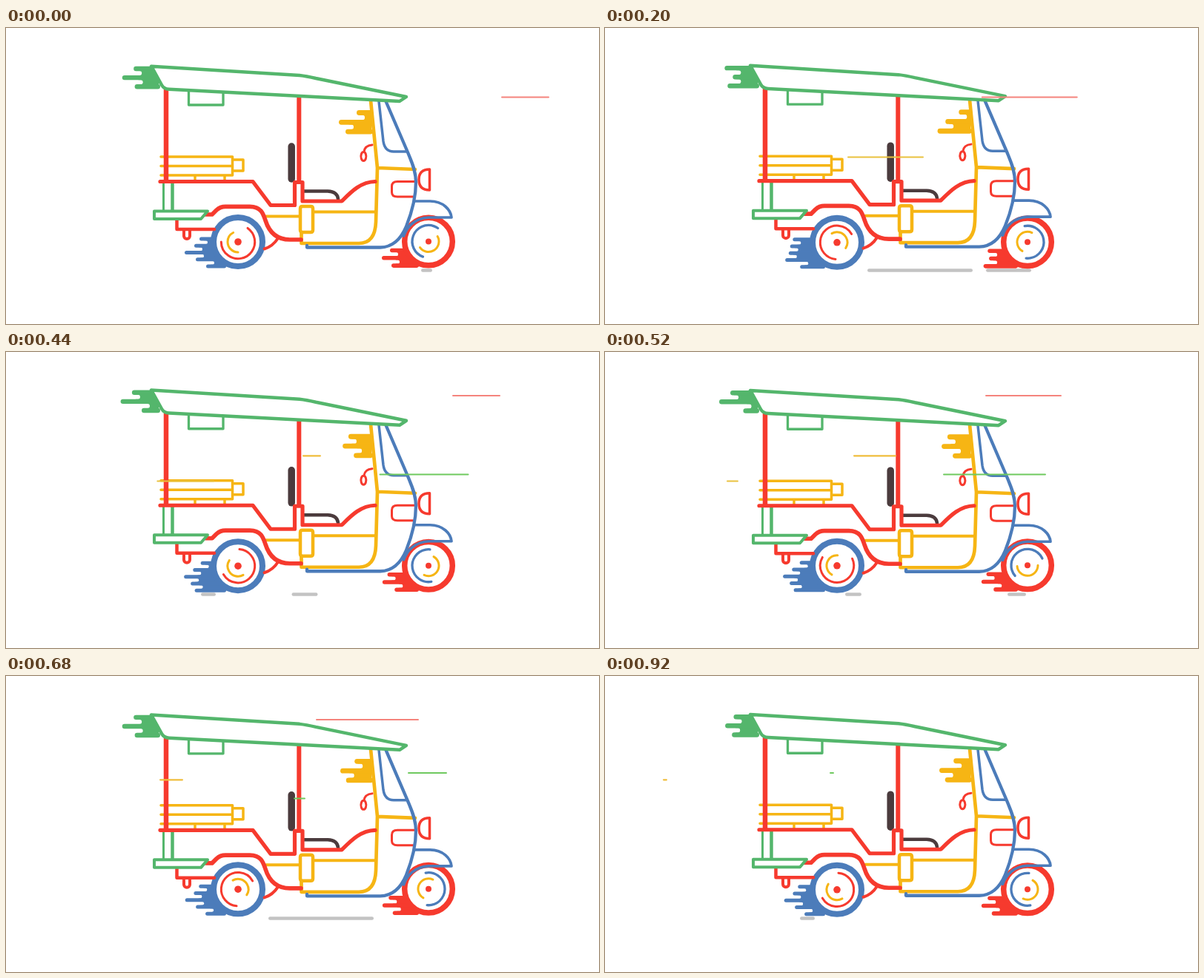
Write an HTML page with a canvas that moves like this. It is 800 px wide and 400 px high and loops after 0.96 s.

```html
<!DOCTYPE html>
<html lang="en">
<head>
<meta charset="utf-8">
<title>Speeding tuk-tuk</title>
<style>
html, body { margin: 0; width: 100%; height: 100%; overflow: hidden; background: #fff; }
canvas { display: block; }
</style>
</head>
<body>
<canvas id="stage" width="800" height="400"></canvas>
<script>
const ctx = document.getElementById('stage').getContext('2d');
const RED = '#f63a2e', GREEN = '#54b66c', BLUE = '#4c7cba', YELLOW = '#f6b514', DARK = '#4b3b3d';
const STEP = 40, STEPS = 24;

function stroke(color, width, d, fill) {
  const path = new Path2D(d);
  if (fill) { ctx.fillStyle = fill; ctx.fill(path); }
  ctx.strokeStyle = color;
  ctx.lineWidth = width;
  ctx.stroke(path);
}

// Horizontal round-capped bar whose caps lie inside x1..x2
function bar(color, width, x1, x2, y) {
  const r = Math.min(width, x2 - x1) / 2;
  stroke(color, width, `M${x1 + r} ${y}H${x2 - r}`);
}

function arc(color, width, x, y, r, from, to) {
  ctx.beginPath();
  ctx.arc(x, y, r, from * Math.PI / 180, to * Math.PI / 180);
  ctx.strokeStyle = color;
  ctx.lineWidth = width;
  ctx.stroke();
}

function disc(color, x, y, r) {
  ctx.beginPath();
  ctx.arc(x, y, r, 0, 7);
  ctx.fillStyle = color;
  ctx.fill();
}

// Flame-like rows: each cycle of 8 steps stretches from the rest pose to another and back
function streak(color, right, top, pitch, poses, time) {
  const t = (time + STEPS) % STEPS;
  const target = poses[1 + Math.floor(t / 8)];
  const w = (1 - Math.cos(t * Math.PI / 4)) / 2;
  const tips = poses[0].map((x, i) => x + (target[i] - x) * w);
  const half = pitch / 2;
  for (let i = 0; i < tips.length - 1; i++) {
    const notch = Math.max(tips[i], tips[i + 1]) + 11, y = top + (i + 0.5) * pitch;
    ctx.fillStyle = color;
    ctx.fillRect(notch - half, y - half, right - notch + half, pitch);
    bar('#fff', half, notch - 10, notch, y);
  }
  tips.forEach((x, i) => bar(color, half + 0.4, x, right + 2, top + i * pitch));
}

// Keys are [step, head, tail]
function dash(color, width, y, keys, t, dx = 0) {
  const i = keys.findIndex((key, n) => n && t <= key[0]);
  if (i < 1 || t < keys[0][0]) return;
  const a = keys[i - 1], b = keys[i], p = (t - a[0]) / (b[0] - a[0]);
  const at = n => a[n] + (b[n] - a[n]) * p + dx;
  if (at(2) - at(1) > 1) bar(color, width, at(1), at(2), y);
}

const gust = [[2.2, 158, 158], [3, 89, 154], [5, 0, 103], [9, -95, 44],
  [12, -138, -91], [13, -163, -147], [14, -176, -176]];
const lowGust = [[11, 400, 425], [13, 335, 393], [17, 207, 239], [21, 78, 84], [24, 78, 84]];
const highGust = [[16, 582, 615], [17, 542, 595], [21, 322, 332], [23, 303, 309]];
const rearShadow = [[1, 543, 568], [5, 354, 496], [9, 297, 378], [11, 263, 283]];
const frontShadow = [[0, 560, 575], [5, 514, 575], [9, 447, 495], [13, 324, 346], [14.5, 285, 285]];

const greenTips = [[172, 156, 174], [161, 173, 165], [169, 154, 187], [177, 176, 165]];
const yellowTips = [[473, 449, 458], [478, 461, 447], [460, 455, 471], [454, 463, 463]];
const blueTips = [[261, 254, 241, 256, 270], [252, 249, 249, 241, 262],
  [263, 252, 240, 248, 252], [256, 250, 246, 257, 264]];
const redTips = [[518, 507, 520], [516, 520, 509], [514, 508, 525], [506, 513, 532]];

function drawWheels(t) {
  const spin = t * 30;
  streak(BLUE, 295, 285, 9.25, blueTips, t);
  disc('#fff', 313, 289, 33);
  arc(BLUE, 8, 313, 289, 33, 0, 360);
  arc(RED, 3, 313, 289, 22.7, spin - 55, spin + 180);
  arc(YELLOW, 3, 313, 289, 14, spin + 90, spin + 243);
  disc(RED, 313, 289, 4.8);

  streak(RED, 555, 300.5, 10.3, redTips, t);
  disc('#fff', 570, 288.5, 32);
  arc(RED, 7.5, 570, 288.5, 32.3, 0, 360);
  arc(BLUE, 3.3, 570, 288.5, 22, spin + 110, spin + 305);
  arc(YELLOW, 3, 570, 288.5, 14, spin - 30, spin + 145);
  disc(RED, 570, 288.5, 4);
}

function drawBody(t) {
  // Rear stand and cargo
  stroke(GREEN, 3, 'M212.5 208V247');
  stroke(GREEN, 4.5, 'M224.5 208V247');
  stroke(RED, 4.5, 'M230.5 258V272H281');
  stroke(RED, 4, 'M240 274V281a4 4 0 0 0 8 0V274');
  stroke(YELLOW, 3.5, 'M209 174H305.5V199H209M209 186.5H305M305.5 178H320V193H305.5M255 199V206M295 199V206');

  // Posts and seat
  stroke(RED, 6.5, 'M216 84V206');
  stroke(RED, 6, 'M395.3 94V206');
  stroke(DARK, 9.5, 'M385.2 160V204');
  stroke(DARK, 4.5, 'M401 220.5H434Q447 221 448 231');

  // Yellow front panel
  stroke(YELLOW, 4, 'M351 254.5H397M414 248.5H498');
  streak(YELLOW, 493, 114.5, 12.8, yellowTips, t);
  stroke(YELLOW, 4.7, 'M492 98L501 189L499 262Q498 291 476 291H398.5V277M501 189L552 191');

  // Red frame
  stroke(RED, 5.2, 'M208 207.5H333L357 239.5H389.5V208.5H400V234H453C465 222 478 208 498 207.5');
  stroke(RED, 5.7, 'M270 252H278L284 246Q289 241.3 296 241.3H329C344 241.3 347 251 350 260C355 276 365 286 383 286H398');
  stroke(RED, 4, 'M348.5 298.5Q360 295 367 284');
  stroke(GREEN, 4, 'M200 247.5H272L263 258H200Z', '#fff');
  stroke(YELLOW, 4.5, 'M400 241H411Q414 241 414 244V273Q414 276 411 276H400Q397 276 397 273V244Q397 241 400 241Z', '#fff');

  // Windscreen, nose and lamp
  stroke(RED, 3, 'M552 207.5H528Q520.5 207.5 520.5 214V222Q520.5 228 528 228H549');
  stroke(RED, 3, 'M494 158Q484 159 483 167M482.3 167.5a3.5 6 0 1 0 .1 0Z');
  stroke(RED, 3.5, 'M571.5 191V219C560 219 557 212 557 205C557 198 560 191 571.5 191Z');
  stroke(BLUE, 3.5, 'M503 99L509 153Q511 167 523 167H541');
  stroke(BLUE, 4.3, 'M406 294V296.5H505C525 296 535 280 540 268C548 248 553 225 553 208C553 192 546 178 542 168L512 98');
  stroke(BLUE, 3.7, 'M552 234H572C590 234 600 246 601 256H570C552 257 541 268 536.5 281');

  // Roof
  stroke(GREEN, 3.3, 'M246.5 85V104H293V87');
  streak(GREEN, 206, 55, 12.1, greenTips, t - 0.5);
  stroke(GREEN, 4.5, 'M196 51.7L396 64Q405 65 418 68L540 93L531 99L220 82.8Q213 82.5 210 77Z', '#fff');
}

function drawAt(t) {
  const bounce = Math.sin(t / STEPS * 2 * Math.PI);
  ctx.fillStyle = '#fff';
  ctx.fillRect(0, 0, 800, 400);
  ctx.lineCap = ctx.lineJoin = 'round';

  dash('#c3c3c3', 4.5, 327.6, rearShadow, t % 12);
  dash('#c3c3c3', 4.5, 327.6, frontShadow, t);

  ctx.save();
  ctx.translate(0, bounce * 0.8);
  drawWheels(t);
  ctx.translate(0, -bounce * 1.7);
  drawBody(t);
  ctx.restore();

  dash('#f5847d', 2.2, 93.5, gust, t + 3, 579);
  dash('#e9c23f', 2.2, 174.5, gust, t, 327);
  dash('#6fc95f', 2.2, 165.5, gust, t - 4, 551);
  dash('#f5847d', 2.2, 59, gust, t - 8, 513);
  dash('#f0bd3c', 2.2, 140.3, lowGust, t);
  dash('#6fc95f', 2.2, 131, highGust, t);
}

function tick() {
  drawAt(Math.floor((performance.now() + 1) / STEP) % STEPS);
  requestAnimationFrame(tick);
}
tick();
</script>
</body>
</html>
```
